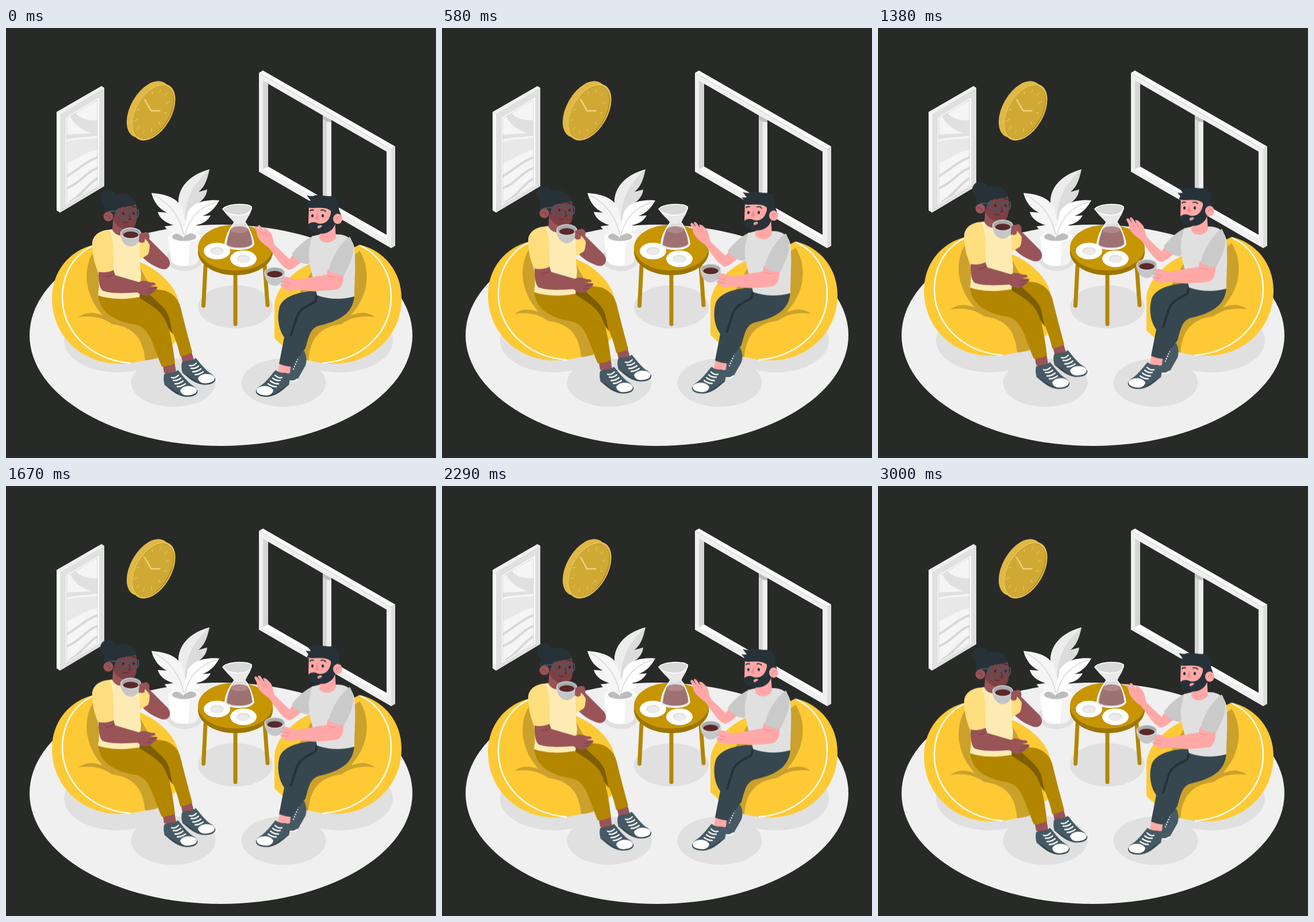
An HTML page without scripts that plays this animation: 748x748 px, repeating every 3040 ms.

```html
<!DOCTYPE html>
<html lang="en">
<head>
<meta charset="utf-8">
<title>Coffee break</title>
<style>
html, body { margin: 0; width: 100%; height: 100%; overflow: hidden; background: #282a28; }
svg { display: block; width: 100vw; height: 100vh; }
.float { animation: float 3.04s linear infinite; }
@keyframes float { 50% { transform: translateY(-15px); } }
.line { fill: none; stroke-linecap: round; stroke-linejoin: round; }
.shade { fill: #e0e0e0; }
.hair { fill: #263238; }
.dark { fill: #995458; }
.pink { fill: #ffa8a7; }
</style>
</head>
<body>
<svg viewBox="0 0 748 748">
<defs>
  <g id="bag">
    <path fill="#fdca36" d="M153 377C110 387 80 424 80 470C80 536 132 584 197 584C224 584 241 577 263 574L301 540V480C296 447 263 419 232 407L165 383Z"/>
    <path fill="#cba12b" d="M153 388C141 405 138 431 142 449C147 474 158 487 168 500C152 493 138 494 126 503C150 499 170 504 184 515C224 520 239 542 242 578Q254 577 263 574L290 520L233 417L170 400Z"/>
    <path class="line" stroke="#fff" stroke-width="2.4" d="M151 379C115 396 98 431 98 469C98 524 142 576 216 583"/>
  </g>
  <g id="shoe">
    <path fill="#37474f" d="M275 620C284 627 294 638 309 641C323 643 335 639 333 630Z"/>
    <path fill="#455a64" d="M275 603C280 597 290 603 299 595C306 602 315 617 328 624C337 632 329 639 314 639C297 638 290 625 276 621Q273 611 275 603Z"/>
    <path fill="#fff" d="M303 630C308 622 319 621 328 625C336 631 331 638 318 639C309 640 304 636 303 630Z"/>
    <path class="line" stroke="#fff" stroke-width="2.3" d="M288 608Q294 610 300 604M291 613Q298 614 304 609M294 619Q302 619 308 614M298 624Q305 624 312 619"/>
  </g>
  <g id="plate">
    <ellipse rx="23" ry="14.5" fill="#fff"/>
    <ellipse rx="11.5" ry="7" fill="#e0e0e0"/>
    <ellipse cy="1" rx="9.5" ry="5.5" fill="#ebebeb"/>
  </g>
  <g id="cup">
    <path fill="#c4c6c7" d="M-18 0C-18 13-9 23 0 23S18 13 18 0Z"/>
    <ellipse rx="18" ry="10" fill="#e0e0e0"/>
    <ellipse rx="16.5" ry="8.7" fill="#a9abac"/>
    <ellipse cy="2.8" rx="13" ry="5.7" fill="#5b2728"/>
  </g>
  <clipPath id="art"><path d="M106 157L159 125V274L106 305Z"/></clipPath>
</defs>

<!-- floor -->
<ellipse cx="374" cy="534.5" rx="333" ry="192.5" fill="#f0f0f0"/>
<g class="shade">
  <ellipse cx="194" cy="544" rx="93" ry="55"/>
  <ellipse cx="580" cy="544" rx="93" ry="55"/>
  <ellipse cx="291" cy="617" rx="73.5" ry="42"/>
  <ellipse cx="483" cy="617" rx="73.5" ry="42"/>
  <ellipse cx="399" cy="485" rx="65" ry="37.5"/>
  <ellipse cx="311" cy="401" rx="32" ry="22"/>
</g>

<!-- picture -->
<path fill="#f0f0f0" d="M88 146L166 101L171 104L171 275L94 321L88 317Z"/>
<path fill="#fafafa" d="M88 146L94 150V321L88 317Z"/>
<path fill="#e0e0e0" d="M94 150L171 104V275L94 321Z"/>
<path fill="#fff" d="M104 156L162 121V274L104 308Z"/>
<g clip-path="url(#art)">
  <path fill="#f5f5f5" d="M100 120H165V310H100Z"/>
  <path fill="#e0e0e0" d="M119 140C119 153 138 163 162 160V186C148 191 122 188 104 195V186C119 184 136 185 148 182C132 179 116 166 110 150Z"/>
  <path fill="#e8e8e8" d="M104 199C122 190 143 196 162 190V211C138 215 123 230 104 236Z"/>
  <path class="line" stroke="#d8d8d8" stroke-width="4" d="M104 259C127 246 139 231 162 224M104 279C130 271 141 247 162 243M112 302C133 290 143 269 162 260"/>
</g>
<path class="line" stroke="#c9c9c9" stroke-width=".8" d="M106 157L159 125V274L106 305Z"/>

<!-- clock -->
<g transform="matrix(.866 -.5 0 1 248 141.500)"><circle r="44" fill="#dfb847"/></g>
<path fill="#dfb847" d="M222 182L231 188L290 107L280 98Z"/>
<g transform="matrix(.866 -.5 0 1 256.500 146.500)">
  <circle r="44" fill="#e6c150"/>
  <circle r="41.500" fill="#b08b24"/>
  <path fill="#d0a935" d="M-41.500 0A41.500 41.500 0 0 1 36-20A43 43 0 0 1-10 40A41.500 41.500 0 0 1-41.500 0Z"/>
  <circle cx="-3" cy="-3" r="32" class="line" style="stroke-linecap:butt" stroke="#e6c150" stroke-width="6" pathLength="120" stroke-dasharray="1 9"/>
  <path class="line" stroke="#f0d277" stroke-width="2.200" d="M-17-30L-5-5L13 4"/>
</g>

<!-- window -->
<path fill="#fafafa" d="M440 78L447 74L677 206L670 211Z"/>
<path fill="#e0e0e0" d="M670 211L677 206V379L670 383Z"/>
<path fill="#f0f0f0" fill-rule="evenodd" d="M440 78L670 211V383L440 250ZM456 97V241L551 296V152ZM566 160V305L662 360V215Z"/>
<path fill="#d6d6d6" d="M447 91L456 97V241L447 246ZM551 152L558 156V300L551 296Z"/>
<path fill="#fff" d="M456 241L551 296V300L447 246ZM566 305L662 360V367L558 306Z"/>
<path fill="#bdbdbd" d="M551 152L566 160V164L558 163L551 158Z"/>

<!-- plant -->
<path fill="#fff" d="M282 364H338L334 405Q330 414 311 414Q292 414 287 405Z"/>
<path fill="#f2f2f2" d="M320 367L338 364L334 405Q330 413 317 414Z"/>
<ellipse cx="310" cy="363" rx="28" ry="10" fill="#fafafa"/>
<ellipse cx="310" cy="363" rx="21" ry="7.500" fill="#bdbdbd"/>
<path fill="#dcdcdc" d="M354 246C317 256 300 279 300 303L311 362L315 332C329 321 342 318 345 306L329 308C342 301 349 292 350 281L335 285C346 276 350 264 354 246Z"/>
<path fill="#ececec" d="M354 246C317 256 300 279 300 303L311 348C309 302 324 272 354 246Z"/>
<path fill="#f5f5f5" d="M253 287C277 289 292 294 304 308L313 338L309 365C300 354 282 357 276 345L291 343C276 338 267 331 264 320L280 321C265 314 257 302 253 287Z"/>
<path fill="#fff" d="M371 300C348 298 324 303 316 321L307 364C320 355 333 357 341 346L330 343C343 341 351 335 356 326L342 327C355 322 363 314 371 300Z"/>
<path class="line" stroke="#d2d2d2" stroke-width="1.300" d="M259 291C287 307 303 330 309 359M365 303C337 311 319 330 311 360"/>

<!-- table -->
<path class="line" stroke="#b38600" stroke-width="7" d="M347 414L343.500 483M399 428V515M450 414L455 482"/>
<path fill="#9c7500" d="M334 384V392C337 414 365 430 399 430S461 414 464 392V384Z"/>
<ellipse cx="399" cy="382" rx="65" ry="40" fill="#c79500"/>
<use href="#plate" x="367" y="388"/>
<use href="#plate" x="413" y="401.500"/>

<!-- carafe -->
<path fill="#dedede" d="M398 336L390 349C384 360 381 370 381 378Q386 385 406 385T431 376C430 363 424 352 420 344L415 336Z"/>
<path fill="#9e7273" d="M391 350Q406 342 421 349C426 359 428 368 428 376Q422 382 406 382T384 377C385 366 388 357 391 350Z"/>
<ellipse cx="406" cy="351" rx="15" ry="6" fill="#b18889"/>
<path class="line" stroke="#fff" stroke-width="1.800" d="M398 337L390 349C384 360 381 370 381 378Q386 385 406 385T431 376C430 363 424 352 420 344L415 337"/>
<path fill="#e9e9e9" d="M377 315C383 326 392 331 397 339Q407 344 417 337C420 329 427 323 428 310Z"/>
<path fill="#d8d8d8" d="M377 315C381 309 398 305 415 307C428 308 430 313 424 319C413 330 384 326 377 315Z"/>
<path class="line" stroke="#fff" stroke-width="1.500" d="M377 315C381 309 398 305 415 307C428 308 430 313 424 319C413 330 384 326 377 315Z"/>

<!-- woman -->
<g class="float">
  <use href="#bag"/>
  <path class="dark" d="M304 567L322 561L327 578Q317 586 307 581ZM272 582L293 580L296 599Q285 604 275 600Z"/>
  <use href="#shoe" x="31" y="-21"/>
  <use href="#shoe"/>
  <path fill="#b38600" d="M232 464L262 455C287 455 300 470 304 487C311 516 318 542 324 564Q314 570 303 571C298 548 292 533 282 515Z"/>
  <path fill="#7d5e00" d="M233 463L247 461C263 477 279 487 284 504L290 533L277 514C267 494 250 484 232 472Z"/>
  <path fill="#b38600" d="M160 463C163 494 185 509 225 516C250 521 253 546 271 589Q283 589 294 583C290 551 286 526 277 508C268 490 249 481 232 469Z"/>
  <path class="dark" d="M235 360C243 350 252 356 249 367L281 399C290 410 283 423 270 419C253 413 242 404 234 395Z"/>
  <path fill="#ffde80" d="M231 358C239 363 245 369 250 377Q250 388 247 394L233 403Z"/>
  <path fill="#feebb4" d="M158 366C164 354 177 350 189 350L229 358C233 377 231 405 235 428L232 468C207 473 179 472 160 465C165 439 158 415 155 400Z"/>
  <path class="dark" d="M187 324L208 335L207 352C210 364 191 364 185 351Z"/>
  <path class="dark" d="M161 423L187 421L190 430L231 442C241 437 247 442 254 443Q260 442 260 447L250 449L263 450Q264 455 257 458C250 468 239 469 229 460C209 461 185 463 168 457C161 450 161 435 161 423Z"/>
  <path class="line" stroke="#733c40" stroke-width="1" d="M248 455L261 452M246 460L257 458M174 433Q181 433 187 429"/>
  <path fill="#ffde80" d="M150 372C153 358 165 352 179 351C187 363 188 392 187 421Q175 427 160 424C153 408 149 389 150 372Z"/>

  <circle class="hair" cx="178" cy="295" r="14"/>
  <path fill="#7c4145" d="M186 301L222 299C230 312 229 331 225 343Q221 351 206 350C194 347 186 338 185 326Z"/>
  <path class="hair" d="M171 325C167 300 183 289 203 288C215 289 225 297 225 307C211 313 199 307 191 318L187 331Z"/>
  <ellipse class="dark" cx="178" cy="328" rx="8.500" ry="8.500"/>
  <path class="line" stroke="#733c40" stroke-width="1.200" d="M174 326Q180 326 181 332"/>
  <g class="line" stroke="#455a64" stroke-width="2">
    <path d="M178 319L194 318M195 317Q203 314 211 317Q214 330 205 331Q195 333 195 317ZM215 318Q223 315 230 317Q232 330 224 331Q216 331 215 318ZM211 320Q213 318 215 320"/>
  </g>
  <path class="line" stroke="#263238" stroke-width="1.600" d="M199 312Q203 309 207 311M219 311Q222 309 225 312"/>
  <path class="hair" d="M204 320a2 2.500 0 1 0 .1 0ZM222 320a2 2.500 0 1 0 .1 0Z"/>
  <path class="line" stroke="#56282b" stroke-width="1.300" d="M214 324L217 333H213M204 337Q207 340 211 338"/>
  <use href="#cup" x="217" y="357"/>
  <path class="dark" d="M232 359Q237 354 243 357L241 372Q235 376 231 371Z"/>
</g>

<!-- man -->
<g class="float">
  <g transform="matrix(-1 0 0 1 768 0)">
    <use href="#bag"/>
  </g>
  <path fill="#455a64" d="M507 563L519 562Q525 575 521 587L508 610Q500 618 490 615L491 597Z"/>
  <path class="line" stroke="#fff" stroke-width="2.200" stroke-dasharray=".1 4.500" d="M509 572L499 596"/>
  <path class="line" stroke="#fff" stroke-width="2.500" d="M507 611Q500 616 493 614"/>
  <path class="pink" d="M476 581L496 581L494 600Q484 604 473 599Z"/>
  <g transform="matrix(-1 0 0 1 768 0)">
    <use href="#shoe"/>
  </g>
  <path fill="#37474f" d="M606 462C606 492 586 508 548 517C529 520 527 536 521 557L497 589Q486 589 475 584L484 538C473 523 472 501 475 489C478 470 501 461 528 458Z"/>
  <path class="line" stroke="#263238" stroke-width="4" d="M541 465L538 476C522 484 509 490 505 505L496 534"/>
  <path class="pink" d="M526 397C513 407 504 417 493 421C480 418 469 397 457 382C444 374 436 364 436 355L432 347Q433 343 437 346L443 354L438 345Q439 341 443 345L450 355L447 348Q452 347 457 353C466 360 463 370 468 378L493 402L511 381Z"/>
  <path class="line" stroke="#ef8686" stroke-width="1" d="M443 354L448 360M450 355L453 360"/>
  <path fill="#c9c9c9" d="M535 361C519 369 507 380 497 393Q506 409 526 411L540 383Z"/>
  <path fill="#e0e0e0" d="M532 363Q550 356 575 359C593 359 603 367 606 382C609 409 606 440 606 467Q573 476 541 465C537 439 525 414 527 387Z"/>
  <path class="pink" d="M547 335L572 335L574 364C567 377 549 375 545 366Z"/>

  <g transform="translate(467.500 425.500)">
    <use href="#cup"/>
    <path class="line" stroke="#b0b4b6" stroke-width="2.600" d="M15 10C26 4 25 16 12 16"/>
  </g>
  <path class="pink" d="M560 419L587 424C588 440 585 452 575 455C548 459 522 457 503 455C493 460 482 455 477 447Q479 443 485 442L480 437Q483 431 493 434L506 438L558 429Z"/>
  <path class="line" stroke="#ef8686" stroke-width="1" d="M484 442L493 444M482 448L491 449M560 431Q566 434 573 433"/>
  <path fill="#cacaca" d="M598 363C579 377 566 401 561 422Q573 430 588 430C597 413 605 397 604 380Q602 369 598 363Z"/>

  <path class="pink" d="M527 307H568L575 328C573 346 561 357 546 356Q528 357 526 341Z"/>
  <path class="hair" d="M526 341Q534 335 543 340C556 343 564 333 566 318L574 324C576 345 566 358 546 358Q528 357 525 346Z"/>
  <path class="hair" d="M523 312L526 306L521 300Q528 301 530 300L523 291Q534 294 537 291C549 290 558 294 568 292C578 294 580 305 579 315L583 326L573 333L566 330L565 318C554 309 539 315 523 312Z"/>
  <ellipse class="pink" cx="577" cy="332" rx="8" ry="9"/>
  <path class="line" stroke="#ef8686" stroke-width="1.300" d="M574 333Q577 327 581 329"/>
  <path fill="#f28f8f" d="M542 321L537 333L544 334Z"/>
  <path class="hair" d="M533 324a2.200 2.700 0 1 0 .1 0ZM551 324a2.200 2.700 0 1 0 .1 0Z"/>
  <path class="line" stroke="#263238" stroke-width="1.800" d="M529 318Q532 315 535 317M548 317Q552 315 556 319"/>
  <path fill="#fff" d="M542 345Q546 342 550 344Q547 349 542 348Z"/>
  <path fill="#ed8585" d="M542 346Q547 343 549 345Q546 350 542 348Z"/>
</g>
</svg>
</body>
</html>
```
